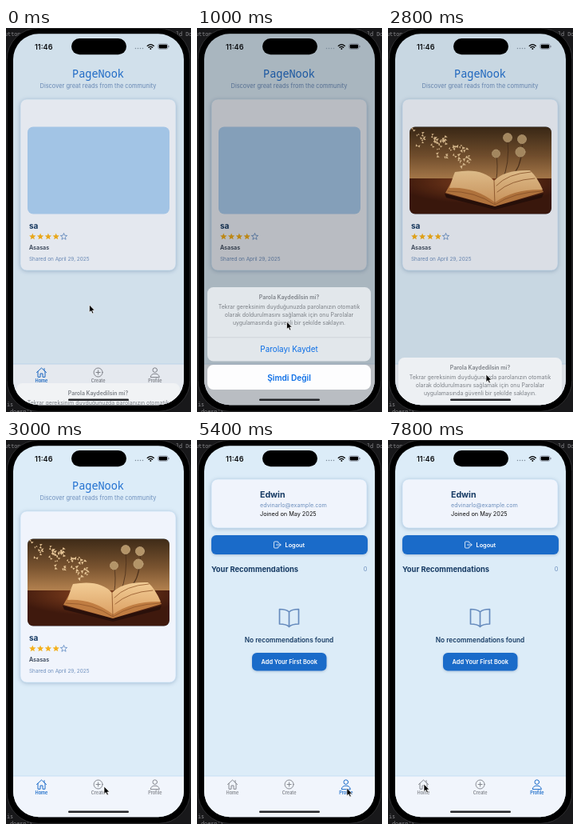
These frames come from a looping animation (232x480 px, 8000 ms). An HTML page:

```html
<!DOCTYPE html>
<html lang="en">
<head>
<meta charset="utf-8">
<title>Book app demo</title>
<style>
  html, body { margin: 0; width: 100%; height: 100%; overflow: hidden; background: #18181a; }
  svg { display: block; width: 232px; height: 480px; }
  text { font-family: Inter, "Open Sans", sans-serif; fill: #163a63; white-space: pre; }
  .mid { text-anchor: middle; }
  .semi { font-weight: 600; }
  .bold { font-weight: 700; }
  .mono { font-family: "Noto Sans Mono", monospace; }
  .soft { fill: #6d8fbd; }
  .card { fill: #f0f4fc; stroke: #c5dff5; stroke-width: .6; filter: drop-shadow(0 1px 2.5px rgba(30, 70, 120, .28)); }
  .button { fill: #1a6bc9; filter: drop-shadow(0 1px 1.5px rgba(20, 60, 120, .25)); }
  .button + text { fill: #fff; }
  .line { fill: none; stroke-linecap: round; stroke-linejoin: round; }
  .tab { color: #85888f; }
  .tab.on { color: #1a6bc9; }
  .tab text { font-size: 5.5px; font-weight: 600; text-anchor: middle; fill: currentColor; }
  .tab path, .tab circle { fill: none; stroke: currentColor; stroke-width: 1; stroke-linecap: round; stroke-linejoin: round; }
  .grey text { font-size: 6.95px; text-anchor: middle; fill: #7c8087; }
  .term { font-size: 6.8px; fill: #8d8d91; }
  .action { fill: #0a6de6; text-anchor: middle; }
</style>
</head>
<body>
<svg viewBox="0 0 232 480">
  <defs>
    <clipPath id="screenClip"><rect x="9" y="7.2" width="214" height="464" rx="32"/></clipPath>
    <clipPath id="photoClip"><rect x="27" y="123.5" width="178" height="109" rx="7"/></clipPath>
    <linearGradient id="wall" x2="0" y2="1">
      <stop offset="0" stop-color="#3d2a17"/>
      <stop offset=".55" stop-color="#7a5430"/>
      <stop offset="1" stop-color="#b58350"/>
    </linearGradient>
    <radialGradient id="table" cx=".5" cy=".1" r=".6">
      <stop offset="0" stop-color="#8a4520"/>
      <stop offset="1" stop-color="#3f190d"/>
    </radialGradient>
    <linearGradient id="page" x2="0" y2="1">
      <stop offset="0" stop-color="#f2cd96"/>
      <stop offset="1" stop-color="#dca165"/>
    </linearGradient>
  </defs>

  <rect width="232" height="480" fill="#18181a"/>
  <text class="mono term" x="-2" y="9.5">utton</text>
  <text class="mono term" x="213" y="9.5">ld Do</text>
  <text class="mono term" x="1" y="473">is</text>
  <text class="mono term" x="5" y="482">doesn't</text>
  <rect x="1.2" y=".3" width="229.6" height="479" rx="39" fill="#000" stroke="#39393c" stroke-width=".8"/>

  <g clip-path="url(#screenClip)">
    <rect x="9" y="7" width="214" height="466" fill="#dcecf8"/>

    <g id="home">
      <text class="mono mid" x="115.5" y="62" font-size="13.5" style="fill:#1f6fd0">PageNook</text>
      <text class="mid soft" x="115.5" y="75" font-size="7.45">Discover great reads from the community</text>
      <rect class="card" x="18" y="89" width="195" height="214" rx="8"/>
      <rect x="27" y="123.5" width="178" height="109" rx="7" fill="#abcef1"/>
      <g id="photo" clip-path="url(#photoClip)">
        <rect x="27" y="123" width="178" height="66" fill="url(#wall)"/>
        <rect x="27" y="188" width="178" height="45" fill="url(#table)"/>
        <g id="scraps" fill="#e6c596"/>
        <g id="puffs" class="line" stroke="#4a2f1b" stroke-width=".8"/>
        <path d="M71 207 L134 223 L195 207 L193 212 L134 227 L73 212Z" fill="#2a100a"/>
        <path d="M72 206 L84 184 L134 200 L180 180 L195 205 L134 223Z" fill="#c07d42"/>
        <path d="M77 200 Q82 184 84 180 Q118 174 133 191 L134 218 Q108 198 77 200Z" fill="url(#page)"/>
        <path d="M133 191 Q146 177 178 178 Q187 186 194 202 Q158 201 134 218Z" fill="url(#page)"/>
        <path class="line" d="M133 191 L134 220 M75 204 Q110 204 134 221 Q158 205 194 204 M136 197 Q150 182 179 180 M137 205 Q154 190 184 188" stroke="#91562a" stroke-width=".8"/>
      </g>
      <text class="bold" x="29" y="250.5" font-size="10">sa</text>
      <g id="stars"/>
      <text x="29" y="277.2" font-size="7.25" font-weight="500" style="fill:#1b2a3f">Asasas</text>
      <text class="soft" x="29" y="291" font-size="6.42">Shared on April 29, 2025</text>
    </g>

    <g id="profile">
      <rect class="card" x="18" y="49" width="195" height="61" rx="8"/>
      <text class="bold" x="79" y="72" font-size="10.6">Edwin</text>
      <text class="soft" x="79" y="83.6" font-size="7.2">edvinarlo@example.com</text>
      <text x="79" y="95" font-size="7.3" style="fill:#111">Joined on May 2025</text>
      <rect class="button" x="18" y="119" width="196" height="24" rx="6"/>
      <text class="semi" x="110.5" y="133.6" font-size="7.3">Logout</text>
      <path class="line" d="M102 129 V128 Q102 127 101 127 H97.5 Q96.5 127 96.5 128 V134 Q96.5 135 97.5 135 H101 Q102 135 102 134 V133 M99.5 131 H105 M103.2 129 L105.2 131 L103.2 133" stroke="#fff" stroke-width=".8"/>
      <text class="bold" x="18" y="165" font-size="9.4">Your Recommendations</text>
      <text class="soft" x="213.5" y="164" font-size="7.5" text-anchor="end">0</text>
      <path class="line" d="M115.5 215 Q112 211.5 103.5 211.5 V230 Q112 230 115.5 233.5 Q119 230 127.5 230 V211.5 Q119 211.5 115.5 215 V233.5" stroke="#668bbd" stroke-width="1.7"/>
      <text class="mid semi" x="115.5" y="253" font-size="8.3">No recommendations found</text>
      <rect class="button" x="69" y="266" width="93.5" height="22.5" rx="6"/>
      <text class="mid semi" x="115.8" y="280" font-size="7.4">Add Your First Book</text>
    </g>

    <rect x="9" y="420" width="214" height="53" fill="#f1f5fc"/>
    <path d="M9 420 H223" stroke="#bedaf2" stroke-width=".8"/>
    <g class="tab" id="homeTab">
      <path d="M38.5 430.5 L44.5 425 L50.5 430.5 M40 429.3 V436.3 H43 V432 H46 V436.3 H49 V429.3 M48 428 V425.6"/>
      <text x="44.4" y="443.3">Home</text>
    </g>
    <g class="tab">
      <circle cx="115.6" cy="430.5" r="5.5"/>
      <path d="M115.6 428 V433 M113.1 430.5 H118.1"/>
      <text x="115.6" y="443.3">Create</text>
    </g>
    <g class="tab" id="profileTab">
      <circle cx="186.8" cy="427.6" r="2.8"/>
      <path d="M181.3 436.3 Q181.8 432.2 186.8 432.2 Q191.8 432.2 192.3 436.3Z"/>
      <text x="186.8" y="443.3">Profile</text>
    </g>

    <rect id="dim" x="9" y="7" width="214" height="466"/>
    <g id="sheet">
      <rect id="panel" x="13" y="324" width="205" height="92.5" rx="7.5"/>
      <path d="M13 386.8 H218" stroke="#c3c7cd" stroke-width=".6"/>
      <g class="grey">
        <text class="semi" x="115.5" y="339">Parola Kaydedilsin mi?</text>
        <text x="115.5" y="351.3">Tekrar gereksinim duyduğunuzda parolanızın otomatik</text>
        <text x="115.5" y="360.9">olarak doldurulmasını sağlamak için onu Parolalar</text>
        <text x="115.5" y="370.5">uygulamasında güvenli bir şekilde saklayın.</text>
      </g>
      <text class="action" x="115.5" y="405.3" font-size="9.9">Parolayı Kaydet</text>
      <rect x="13" y="421" width="205" height="31" rx="7.5" fill="#fdfdfe"/>
      <text class="action semi" x="115.5" y="440.6" font-size="10.1">Şimdi Değil</text>
    </g>

    <text class="semi" x="36" y="26.8" font-size="9.1" style="fill:#0b0d10">11:46</text>
    <rect x="82" y="13" width="69" height="20.2" rx="10.1"/>
    <path class="line" d="M162.5 25.6 H173" stroke="#7b8a99" stroke-width="1.5" stroke-dasharray="0 3"/>
    <path class="line" d="M177.2 22.4 Q181.3 18.8 185.4 22.4 M178.9 24.3 Q181.3 22.3 183.7 24.3" stroke="#000" stroke-width="1.3"/>
    <circle cx="181.3" cy="25.9" r="1"/>
    <rect x="190.8" y="19.9" width="12.2" height="6.4" rx="1.9" fill="none" stroke="#556" stroke-width=".5"/>
    <rect x="191.7" y="20.8" width="10.4" height="4.6" rx="1.1"/>
    <path d="M204 22 V24.2" stroke="#556" stroke-width=".8"/>
    <rect x="78" y="463.4" width="76" height="2.6" rx="1.3" fill="#25262a"/>
  </g>

  <path id="cursor" d="M0 0 V9.6 L2.2 7.6 L3.8 11 L5.4 10.2 L3.9 7 H6.8Z" fill="#000" stroke="#fff" stroke-width=".7" stroke-linejoin="round"/>
</svg>
<script>
const LOOP = 8000, TICK = 200;
const LOAD = 1400, SWITCH = 5000;
const $ = id => document.getElementById(id);

// Each row: time, then values; linear in between, equal rows are rests.
const cursorTrack = [
  [0, 104.5, 346], [800, 104.5, 346], [1000, 112.5, 367], [1600, 121, 420],
  [1800, 121, 420], [2200, 123, 433], [3000, 123, 433], [4000, 93.5, 415.5],
  [4800, 186, 436], [6200, 190.5, 434], [6400, 190.5, 434], [7000, 150, 436],
  [7200, 150, 436], [7800, 45, 430]
];
const sheetTrack = [[0, 120], [200, 16], [400, 2], [600, 0], [2600, 0], [2800, 88], [3000, 150]];
const dimTrack = [[0, .05], [200, .2], [400, .23], [2600, .23], [2800, .09], [3000, 0]];

function sample(track, t) {
  const next = track.findIndex(row => row[0] > t);
  if (next < 0) return track[track.length - 1].slice(1);
  const a = track[next - 1], b = track[next];
  const k = (t - a[0]) / (b[0] - a[0]);
  return a.slice(1).map((v, i) => v + (b[i + 1] - v) * k);
}

function add(parent, tag, attrs) {
  const node = document.createElementNS("http://www.w3.org/2000/svg", tag);
  for (const key in attrs) node.setAttribute(key, attrs[key]);
  parent.append(node);
}

function drawStars() {
  for (let n = 0; n < 5; n++) {
    const points = Array.from({ length: 10 }, (_, i) => {
      const r = i % 2 ? 1.9 : 4.4, a = i * Math.PI / 5;
      return [33.3 + n * 9.8 + r * Math.sin(a), 260.8 - r * Math.cos(a)].map(v => v.toFixed(2));
    });
    const full = n < 4;
    add($("stars"), "polygon", {
      points: points.join(" "), fill: full ? "#f4b01b" : "none",
      stroke: full ? "none" : "#5d8ac2", "stroke-width": .8, "stroke-linejoin": "round"
    });
  }
}

function drawPhoto() {
  let seed = 11;
  const rand = () => (seed = seed * 16807 % 2147483647) / 2147483647;
  for (let i = 0; i < 38; i++) {
    const drift = rand();
    const x = 31 + drift * 66 + rand() * 14, y = 126 + drift * 24 + rand() * 24;
    const size = .8 + rand() * .8;
    add($("scraps"), "path", {
      d: "M0 0 L-2.4 -1.6 L-1.8 1.2Z L2.2 -1.8 L2 .9Z",
      transform: `translate(${x} ${y}) rotate(${rand() * 180}) scale(${size})`
    });
  }
  for (const [x, y, r] of [[150, 137, 5.5], [168, 139, 5.5], [135.5, 157, 5], [166, 155, 6]]) {
    add($("puffs"), "path", { d: `M${x} ${y} Q${x + 3} 172 ${143 + (x - 150) / 2} 190` });
    add($("puffs"), "circle", { cx: x, cy: y, r, fill: "#b39468", stroke: "#d9bf95", "stroke-dasharray": ".5 1.4" });
  }
}

function render(time) {
  const t = Math.floor(time % LOOP / TICK) * TICK;
  const [x, y] = sample(cursorTrack, t);
  const [drop] = sample(sheetTrack, t);
  const [dim] = sample(dimTrack, t);
  const onProfile = t >= SWITCH;
  $("cursor").setAttribute("transform", `translate(${x} ${y})`);
  $("sheet").setAttribute("transform", `translate(0 ${drop})`);
  $("panel").style.fill = `hsl(210, 18%, ${96.5 - dim * 26}%)`;
  $("dim").style.opacity = dim;
  $("photo").style.display = t >= LOAD ? "" : "none";
  $("home").style.display = onProfile ? "none" : "";
  $("profile").style.display = onProfile ? "" : "none";
  $("homeTab").classList.toggle("on", !onProfile);
  $("profileTab").classList.toggle("on", onProfile);
}

drawStars();
drawPhoto();
const start = performance.now();
function loop(now) {
  render(Math.max(0, now - start));
  requestAnimationFrame(loop);
}
render(0);
requestAnimationFrame(loop);
</script>
</body>
</html>
```
